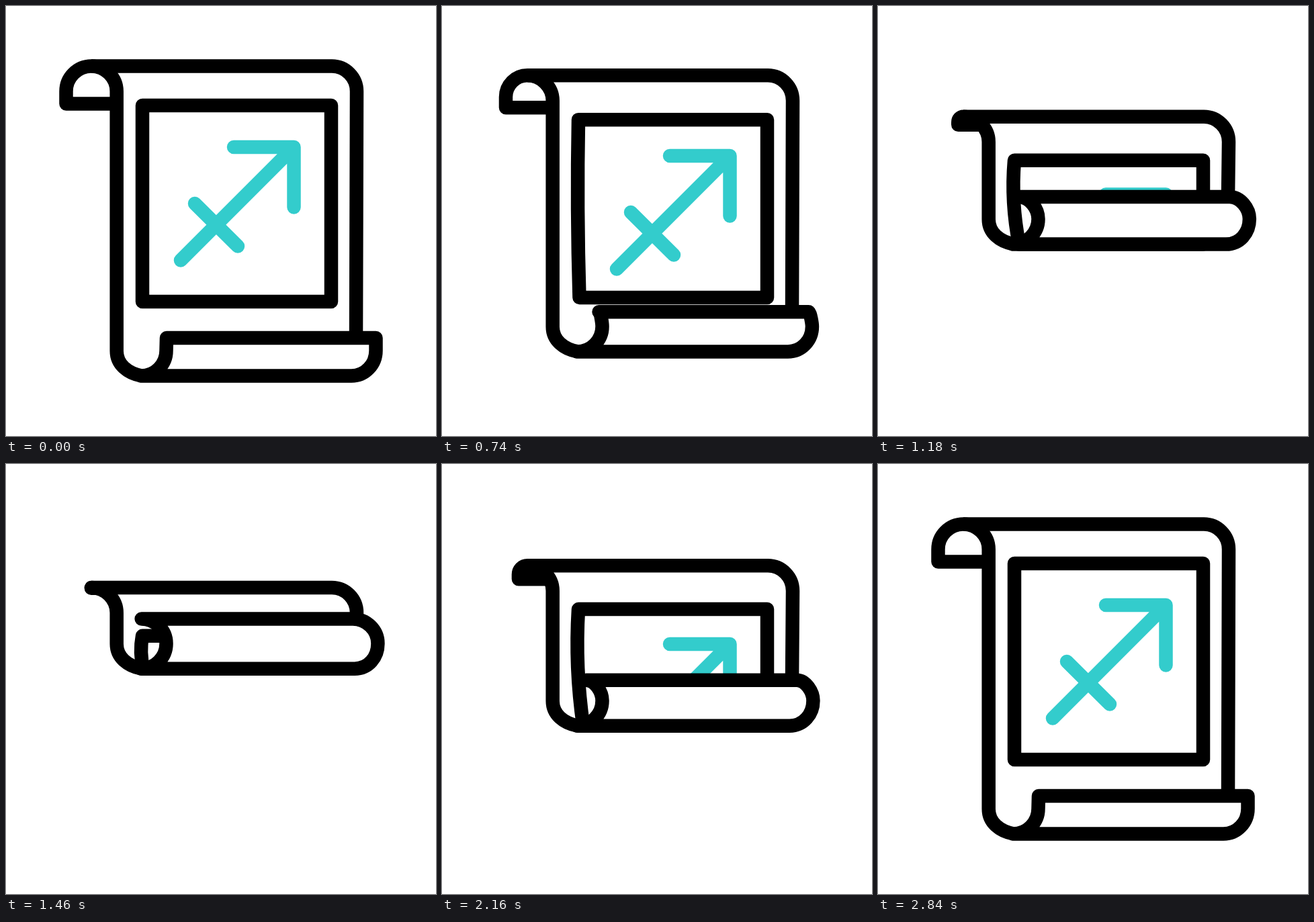
An HTML page with a canvas for the animation above (3.6 s loop, 640x640 px).

```html
<!DOCTYPE html>
<html lang="en">
<head>
<meta charset="utf-8">
<title>Scroll</title>
<style>
  html, body { margin: 0; height: 100%; overflow: hidden; background: #fff; }
  canvas { display: block; }
</style>
</head>
<body>
<canvas id="stage" width="640" height="640"></canvas>
<script>
const ctx = document.getElementById('stage').getContext('2d');
const LOOP = 3600, STEP = 20, TURN = 1620, HALF = 1220, MOVE = 1186;
const INK = '#000', TEAL = '#33cccc';
const KAPPA = 20.6; // handle length of a quarter circle of radius 37.5

// Symmetric cubic-bezier(h, 0, 1 - h, 1)
function ease(u, h) {
  let low = 0, high = 1;
  for (let i = 0; i < 24; i++) {
    const s = (low + high) / 2, r = 1 - s;
    const x = 3 * h * s * r * r + 3 * (1 - h) * s * s * r + s * s * s;
    if (x < u) low = s; else high = s;
  }
  return low * low * (3 - 2 * low);
}

function stroke(d, color = INK, cap = 'butt', fill) {
  const path = new Path2D(d);
  if (fill) {
    ctx.fillStyle = fill;
    ctx.fill(path);
  }
  ctx.strokeStyle = color;
  ctx.lineCap = cap;
  ctx.stroke(path);
}

function drawPaper(p, top, bar, bottom) {
  const left = 89.5 + 38 * p, tip = 145.5 + 40 * p;
  const bend = 127 + 58.5 * p, k = KAPPA * (1 - p);
  // back of the top curl, top edge and right edge
  stroke(`M160,${tip} H${left} V${bend}
    C${left},${bend - k} ${127 - k},${top} 127,${top} H485
    C505.6,${top} 522,${top + 17} 522,${top + 37.5} L521,${bar}`);
  // front of the top curl and left edge
  stroke(`M127,${top} C147.6,${top} 164.7,${top + 17} 164.7,${top + 37.5}
    V${bottom - 37} C164.7,${bottom - 17} 181,${bottom - 4} 202,${bottom}`);
}

function drawFrame(q, bottom) {
  const top = 148 + 111 * q, base = Math.min(440 - 32 * q, bottom);
  const bow = 203 - 11 * q * (1.4 - q), foot = 203 + 50 * q * q * (1 - q);
  stroke(`M203,${top} H484 V${base} H${foot}
    Q${bow},${(top + base) / 2} 203,${top} Z`);
}

function drawArrow(p, bottom) {
  ctx.save();
  ctx.beginPath();
  ctx.rect(0, 0, 640, bottom);
  ctx.clip();
  ctx.translate(0, 90 * p);
  stroke('M339,210 H428.5 V299.5 M428.5,210 L260,378.5 M281,294 L345,357.5', TEAL, 'round');
  ctx.restore();
}

function drawRoll(p, bar, bottom) {
  const k = KAPPA * p, side = bottom - 37.5;
  const left = 239 - 38 * p, right = 550.5 - 35 * p;
  const end = 514 + 5 * p, edge = 550.5 + 3 * p;
  stroke(`M${left},${bar}
    C${left + k},${bar} 238.5,${side - k} 238.5,${side}
    C238.5,${side + KAPPA} 222,${bottom} 201,${bottom} H${end}
    C${end + KAPPA},${bottom} ${edge},${side + KAPPA} ${edge},${side}
    C${edge},${side - k} ${right + k},${bar} ${right},${bar} Z`, INK, 'butt', '#fff');
}

function draw(now) {
  const t = Math.floor(now % LOOP / STEP) * STEP;
  const u = Math.min(1, Math.max(0, (HALF - Math.abs(t - TURN)) / MOVE));
  const p = ease(u, 0.5), q = ease(u, 0.36);
  const top = 89.5 + 96 * p, bar = 494 - 268 * p, bottom = 550.5 - 250 * p;

  ctx.fillStyle = '#fff';
  ctx.fillRect(0, 0, 640, 640);
  ctx.lineWidth = 20.5;
  ctx.lineJoin = 'round';
  drawPaper(p, top, bar, bottom);
  drawFrame(q, bottom);
  drawArrow(p, bottom);
  drawRoll(p, bar, bottom);
}

const start = performance.now();
function tick() {
  draw(performance.now() - start);
  requestAnimationFrame(tick);
}
tick();
</script>
</body>
</html>
```
